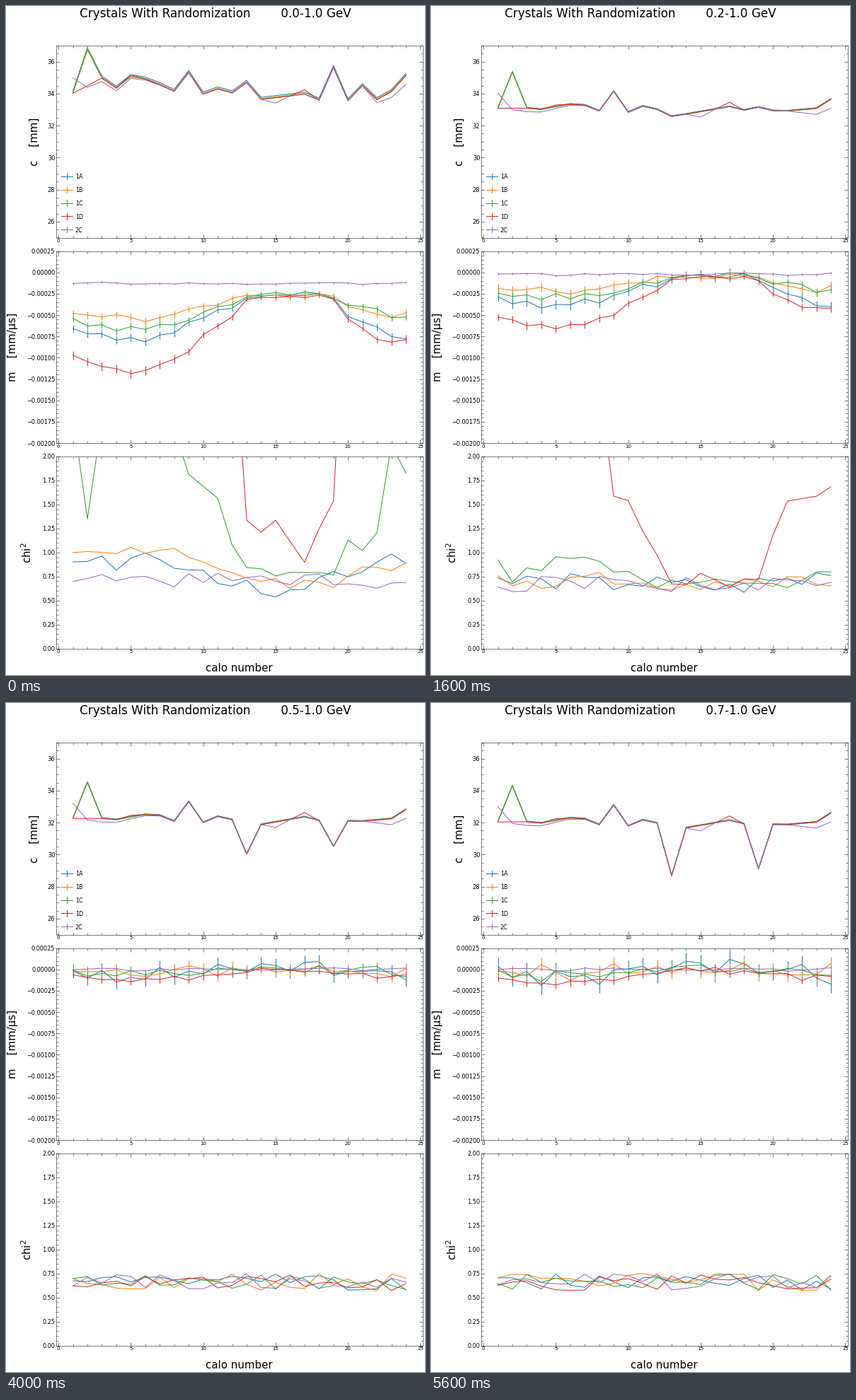
Write a matplotlib script that moves like this. It is 592 by 946 pixels and loops after 6.4 s.

```python
import numpy as np
import matplotlib.pyplot as plt
from matplotlib.animation import FuncAnimation
from matplotlib.ticker import AutoMinorLocator

W, H, DPI = 592, 946, 64
PT = 72 / DPI  # points per pixel
LINE = 1.0 * PT
NAMES = ["1A", "1B", "1C", "1D", "2C"]
COLORS = ["#1f77b4", "#ff7f0e", "#2ca02c", "#d62728", "#9467bd"]
CALO = np.arange(1, 25)

plt.rcParams["font.family"] = "DejaVu Sans"


def curve(*knots):
    """Straight pieces through (calo, value) key points."""
    return np.interp(CALO, *zip(*knots))


def spike(calo, size):
    return np.where(CALO == calo, size, 0.0)


# c [mm]: a common profile that sinks with the cut, calos 13 and 19 fastest
PROFILE = curve((1, 0), (3, 0), (4, -.08), (6, .24), (7, .19), (8, -.18),
                (9, 1.05), (10, -.26), (11, .12), (12, -.08), (14, -.38),
                (17, .09), (18, -.13), (21, -.18), (23, -.02), (24, .55))
UNCUT = curve((1, -.35), (3, .6), (4, .05), (5, .6), (7, 0), (17, -.5),
              (18, -.65), (19, 0), (20, -.65), (21, .3), (22, -.65), (24, .2))


def offsets(cut):
    level = 31.9 + 2.6 * np.exp(-cut / 2.7)
    common = level + PROFILE + spike(13, .85 - .57 * cut) + spike(19, 1.4 - .6 * cut)
    gap = .05
    if cut == 0:
        common, gap = common + UNCUT, .13
    tall = common + spike(2, 2.25)
    red = common - gap + spike(17, .28) + spike(5, .12)
    purple = common - gap + curve((1, .95), (2, -.1), (3, -.22), (5, -.1), (8, 0),
                                  (14, 0), (15, -.34), (16, 0), (21, 0), (24, -.55))
    return [tall, tall - .6 * gap, tall - gap, red, purple]


# m [mm/us]: one double dip, deeper on the left, flat around calo 16
DIP = curve((1, .82), (3, .93), (6, 1), (8, .85), (10, .53), (12, .29), (13, .06),
            (18, 0), (19, .03), (20, .32), (23, .65), (24, .6))
DEPTH = [900, 480, 690, 1560, 0]
RIGHT = [1.5, 1.4, .9, 1, 1]  # weight of the right-hand dip
FADE = [.58, 1, .39, .15, .08, .08, .09, .1]  # dip size for each cut
ERROR = [(30, 10), (32, 6.5), (30, 3.5), (25, 2), (11, 1)]  # start, growth
JITTER = np.random.default_rng(4).uniform(-1, 1, (5, 24))


def slopes(cut):
    fresh = np.random.default_rng(20 + cut).uniform(-.5, .5, (5, 24))
    floor = -260 * np.exp(-.55 * cut ** 1.7)
    values, errors = [], []
    for k in range(5):
        start, growth = ERROR[k]
        dip = DEPTH[k] * FADE[cut] * DIP * np.where(CALO < 20, 1, RIGHT[k])
        half = start + growth * cut + .03 * dip
        base = floor * (.5 if k == 4 else 1) - dip
        values.append((base + (JITTER[k] + fresh[k]) * half) * 1e-6)
        errors.append(half * 1e-6)
    return values, errors


# chi^2: excess over the common level for the two lowest cuts
EXCESS = [
    curve((1, .2), (7, .27), (9, .14), (12, .06), (15, -.04), (18, .03),
          (23, .32), (24, .22)),
    curve((1, .36), (8, .38), (10, .27), (12, .17), (15, .03), (19, .03),
          (21, .22), (24, .22)),
    curve((1, 1.76), (2, .75), (3, 1.8), (7, 1.95), (9, 1.1), (11, .92), (12, .34),
          (13, .17), (19, .07), (20, .4), (22, .47), (23, 1.45), (24, 1.2)),
    curve((1, 30), (8, 16), (9, 6.9), (10, 6.9), (11, 3.9), (12, 2.85), (13, .76),
          (14, .6), (15, .64), (17, .31), (18, .5), (19, .94), (20, 3.75),
          (21, 6.8), (24, 7.7)),
    curve((1, .05), (24, .05)),
]


def chi_squares(cut):
    noise = np.random.default_rng(40 + cut).uniform(-.09, .09, (5, 24))
    return .66 + np.array(EXCESS) * .13 ** max(cut - 1, 0) + noise


fig = plt.figure(figsize=(W / DPI, H / DPI), dpi=DPI, facecolor="white")
page = fig.add_axes([0, 0, 1, 1], xlim=(0, W), ylim=(H, 0))
page.axis("off")


def label(x, y, text, size, **kw):
    return page.text(x, y, text, fontsize=size * PT, **kw)


def panel_axes(top, ylim, ticks, form):
    left, width, height = 71, 517.5, 271.5
    ax = fig.add_axes([left / W, 1 - (top + height) / H, width / W, height / H],
                      xlim=(-0.15, 25.15), ylim=ylim, facecolor="none")
    ax.set_xticks(range(0, 26, 5))
    ax.set_yticks(ticks, [form.format(t).replace("-", "\u2212") for t in ticks])
    ax.xaxis.set_minor_locator(AutoMinorLocator())
    ax.yaxis.set_minor_locator(AutoMinorLocator())
    for which, length in (("major", 5), ("minor", 2.7)):
        ax.tick_params(which=which, direction="in", top=True, right=True,
                       length=length * PT, width=0.5 * PT, pad=1.7 * PT)
    ax.tick_params(axis="x", labelsize=7 * PT)
    ax.tick_params(axis="y", labelsize=8.2 * PT)
    for spine in ax.spines.values():
        spine.set_linewidth(0.5 * PT)
    return ax


ax_c = panel_axes(56, (25, 37), range(26, 37, 2), "{}")
ax_m = panel_axes(346.5, (-0.002, 0.00025),
                  [k * 0.00025 for k in range(-8, 2)], "{:.5f}")
ax_chi = panel_axes(637, (0, 2), [k * 0.25 for k in range(9)], "{:.2f}")

title = label(W / 2, 16, "", 16.7, ha="center")
label(329.5, 941, "calo number", 15, ha="center")
for x, y, text in ((44.5, 191.7, "c    [mm]"), (14.5, 482.3, "m    [mm/\u03bcs]"),
                   (35.5, 773, "chi$^2$")):
    label(x, y, text, 15, rotation=90, rotation_mode="anchor",
          ha="center", va="baseline")

for k, (name, color) in enumerate(zip(NAMES, COLORS)):
    y = 241 + 18.8 * k
    page.plot([77.5, 94], [y, y], color=color, lw=LINE)
    page.plot([85.7, 85.7], [y - 4.2, y + 4.2], color=color, lw=LINE)
    label(97.8, y + 3.3, name, 8)

lines = [[ax.plot([], [], color=c, lw=LINE)[0] for c in COLORS]
         for ax in (ax_c, ax_m, ax_chi)]
bars = [ax_m.vlines([], [], [], color=c, lw=LINE) for c in COLORS]


def draw(cut):
    title.set_text(f"Crystals With Randomization        0.{cut}-1.0 GeV")
    m, errors = slopes(cut)
    for group, values in zip(lines, (offsets(cut), m, chi_squares(cut))):
        for line, v in zip(group, values):
            line.set_data(CALO, v)
    for bar, v, e in zip(bars, m, errors):
        bar.set_segments([[(x, lo), (x, hi)]
                          for x, lo, hi in zip(CALO, v - e, v + e)])
    return []


anim = FuncAnimation(fig, draw, frames=8, interval=800, init_func=lambda: draw(0),
                     repeat=True, repeat_delay=0, blit=False)
plt.show()
```
